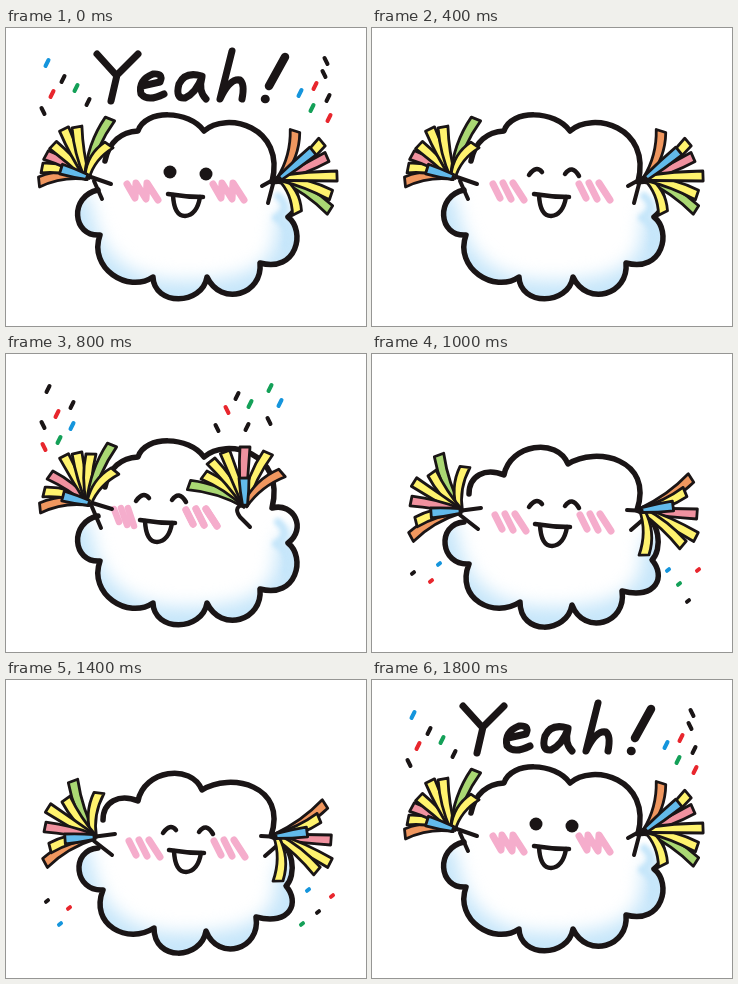
These frames come from a looping animation (360x298 px, 2000 ms). An HTML page with a canvas:

```html
<!DOCTYPE html>
<html lang="en">
<head>
<meta charset="utf-8">
<title>Cheering cloud</title>
<style>
html, body { margin: 0; width: 100%; height: 100%; overflow: hidden; background: #fff; }
canvas { display: block; width: 360px; height: 298px; }
</style>
</head>
<body>
<canvas id="stage" width="360" height="298"></canvas>
<script>
const ctx = document.getElementById('stage').getContext('2d');
const INK = '#1a1516', PINK = '#f5adcc';
const PAPER = { y: '#fff36e', o: '#f0975f', p: '#f0919f', b: '#62baeb', g: '#aad873' };
const BITS = { k: INK, r: '#e8262d', b: '#1595dc', g: '#14a058' };

// Outlines stay open behind the left arm
const clouds = {
  up: new Path2D('M99 133C103 113 116 104 132 103C139 81 183 82 198 103C220 83 280 98 266 154' +
    'C288 148 301 175 282 189C300 203 291 245 254 235C257 267 215 279 201 249' +
    'C196 278 148 278 147 249C122 266 82 240 94 207C66 209 63 168 92 162'),
  down: new Path2D('M97 140C97 122 113 113 132 121C138 90 185 83 196 110C224 92 282 105 265 156' +
    'C290 166 290 196 280 206C294 222 285 246 250 237C255 270 212 282 200 251' +
    'C195 280 148 282 148 248C122 265 83 245 97 210C68 212 64 170 92 168')
};

// Pompoms: hub, arm strokes, then strips as colour + tip in stacking order
const poms = {
  upLeft: { hub: [81, 149], arm: 'M82 148L105 156M88 153L96 171',
    strips: 'o33,154 y36,140 p40,127 y47,117 y58,101 y71,99 g104,91 y103,117 b55,141' },
  upRight: { hub: [274, 150], arm: 'M256 158L276 147M267 156L262 175',
    strips: 'o289,103 y316,114 p321,129 g324,182 y291,185 y325,167 y331,148 b307,123' },
  waveLeft: { hub: [83, 149], arm: 'M83 148L106 155M86 153L95 174',
    strips: 'o34,154 y38,138 p44,121 y58,102 y71,99 y85,100 g106,91 y109,117 b57,142' },
  waveIn: { hub: [239, 151], arm: 'M240 150Q226 152 234 163L244 173',
    strips: 'g183,131 y198,121 y205,107 y219,98 p239,93 y262,99 o276,119 b238,124' },
  downLeft: { hub: [88, 157], arm: 'M86 157L109 154M88 161L106 175',
    strips: 'g67,101 y93,113 y60,119 y42,128 p39,147 o39,183 y44,168 b59,159' },
  downRight: { hub: [270, 156], arm: 'M255 156L273 157M274 163L259 176',
    strips: 'o319,124 y313,138 p325,160 y324,183 y311,191 y272,201 b301,152' }
};
poms.downRightFull = { ...poms.downRight, strips: 'g303,210 ' + poms.downRight.strips };

const confetti = {
  cheer: 'b41,35 k57,51 r46,66 g70,60 k82,74 K37,83 ' +
    'K320,33 K318,46 r309,58 b294,65 k322,70 g306,80 r323,90',
  wave: 'k42,35 k66,51 r51,60 R38,93 K37,71 b66,72 g53,86 ' +
    'g264,34 k231,42 g244,50 b274,49 R221,56 K263,67 k241,73 K211,74',
  fall: 'b67,210 k41,219 r59,227 b296,216 r326,216 g307,230 k316,247',
  land: 'k41,221 r63,228 b54,244 b302,210 r326,216 k312,232 g296,244'
};

const parse = list => list.split(' ').map(s => [s[0], ...s.slice(1).split(',').map(Number)]);

function stroke(path, width, color = INK) {
  ctx.lineWidth = width;
  ctx.strokeStyle = color;
  ctx.stroke(typeof path === 'string' ? new Path2D(path) : path);
}

function shifted(dx, dy, draw) {
  ctx.save();
  ctx.translate(dx, dy);
  draw();
  ctx.restore();
}

function mirrored(draw) {
  ctx.save();
  ctx.transform(-1, 0, 0, 1, 362, 0);
  draw();
  ctx.restore();
}

function cloud(name) {
  const shape = clouds[name];
  ctx.fillStyle = '#fff';
  ctx.fill(shape);
  ctx.save();
  ctx.clip(shape);
  ctx.filter = 'blur(9px)';
  stroke('M68 180Q82 268 175 270Q292 272 287 195', 34, '#c6e6fa');
  ctx.filter = 'blur(2px)';
  if (name === 'up') stroke('M272 168Q286 180 270 190Q286 198 280 218', 8, '#c6e6fa');
  ctx.restore();
  stroke(shape, 5.5);
}

// Strips leave the hub along the pompom's axis, then curl towards their tips
function pom(name) {
  const { hub: [hx, hy], arm, strips } = poms[name];
  const papers = parse(strips);
  stroke(arm, 4);
  let ax = 0, ay = 0;
  for (const [, x, y] of papers) { ax += x - hx; ay += y - hy; }
  const reach = Math.hypot(ax, ay);
  for (const [key, x, y] of papers) {
    const length = Math.hypot(x - hx, y - hy);
    const nx = (hy - y) / length, ny = (x - hx) / length;
    const bend = key === 'b' ? 0 : 9 * (ax * nx + ay * ny) / reach;
    const side = (at, half) => [hx + (x - hx) * at + nx * half, hy + (y - hy) * at + ny * half];
    ctx.beginPath();
    ctx.moveTo(...side(0, 2.5));
    ctx.quadraticCurveTo(...side(.5, bend + 4.5), ...side(1, 5));
    ctx.lineTo(...side(1, -5));
    ctx.quadraticCurveTo(...side(.5, bend - 4.5), ...side(0, -2.5));
    ctx.closePath();
    ctx.fillStyle = PAPER[key];
    ctx.fill();
    ctx.lineWidth = 2.8;
    ctx.strokeStyle = INK;
    ctx.stroke();
  }
}

// Capital letters lean the other way
function scatter(list, dots) {
  for (const [key, x, y] of parse(list)) {
    const lean = dots ? 1 : key < 'a' ? -1.5 : 1.5;
    const rise = dots ? .8 : 3;
    stroke(`M${x + lean} ${y - rise}L${x - lean} ${y + rise}`, 4, BITS[key.toLowerCase()]);
  }
}

function mouth(x, y) {
  shifted(x, y, () => {
    const lips = new Path2D('M-13 1Q-12 22 -1 22Q11 21 14 3');
    ctx.fillStyle = '#fff';
    ctx.fill(lips);
    stroke(lips, 4.5);
    stroke('M-18 0Q0 3 17 3', 4.5);
  });
}

function smileEyes(x, y) {
  shifted(x, y, () => stroke('M-24 3Q-17 -7 -11 0M12 2Q19 -8 26 4', 4.5));
}

const SCRIBBLE = 'M0 0L8 14L9 -1L19 15L20 -1L31 16';
const SLASHES = 'M0 0L7 14M10 -1L18 15M20 -1L31 16';

function cheeks(path, left, right, y) {
  for (const x of [left, right]) shifted(x, y, () => stroke(path, 7, PINK));
}

function lettering() {
  stroke('M91 26L110 47M132 26L111 47L105 73' +
    'M136 58L154 54Q158 45 147 46Q132 52 135 66Q142 74 158 66' +
    'M196 48Q179 43 173 56Q169 71 179 70Q190 65 196 49Q192 63 200 71' +
    'M226 23L214 71Q224 50 234 52Q239 56 236 71', 7);
  stroke('M279 29L263 58M259 71L259.5 71', 8.5);
}

function raised() {
  cloud('up');
  pom('upLeft');
  pom('upRight');
  mouth(180, 166);
}

function cheer() {
  raised();
  ctx.fillStyle = INK;
  for (const [x, y] of [[164, 144], [200, 146]]) {
    ctx.beginPath();
    ctx.arc(x, y, 6.5, 0, 7);
    ctx.fill();
  }
  cheeks(SCRIBBLE, 121, 207, 156);
  lettering();
  scatter(confetti.cheer);
}

function hop() {
  raised();
  smileEyes(181, 144);
  cheeks(SLASHES, 121, 207, 156);
}

function crouch(rightPom, cheekPath, bits) {
  cloud('down');
  pom('downLeft');
  pom(rightPom);
  smileEyes(181, 150);
  mouth(181, 170);
  cheeks(cheekPath, 123, 208, 161);
  if (bits) scatter(bits, true);
}

function waveFace(dx) {
  shifted(dx, 0, () => {
    smileEyes(154, 144);
    mouth(152, 166);
    stroke('M108 155L113 168M115 154L121 171M122 154L128 172', 6.5, PINK);
    cheeks(SLASHES, 180, 180, 156);
  });
}

function waveToLeft() {
  cloud('up');
  waveFace(0);
  pom('waveLeft');
  pom('waveIn');
  scatter(confetti.wave);
}

function waveToRight() {
  cloud('up');
  waveFace(52);
  pom('upRight');
  mirrored(() => {
    pom('waveIn');
    scatter(confetti.wave);
  });
}

const poses = [
  cheer,
  () => crouch('downRightFull', SCRIBBLE),
  hop,
  () => crouch('downRight', SCRIBBLE),
  waveToLeft,
  () => crouch('downRight', SLASHES, confetti.fall),
  waveToRight,
  () => crouch('downRight', SLASHES, confetti.land),
  hop,
  cheer
];

ctx.lineCap = ctx.lineJoin = 'round';

function render() {
  ctx.fillStyle = '#fff';
  ctx.fillRect(0, 0, 360, 298);
  poses[Math.floor(performance.now() % 2000 / 200)]();
  requestAnimationFrame(render);
}
render();
</script>
</body>
</html>
```
